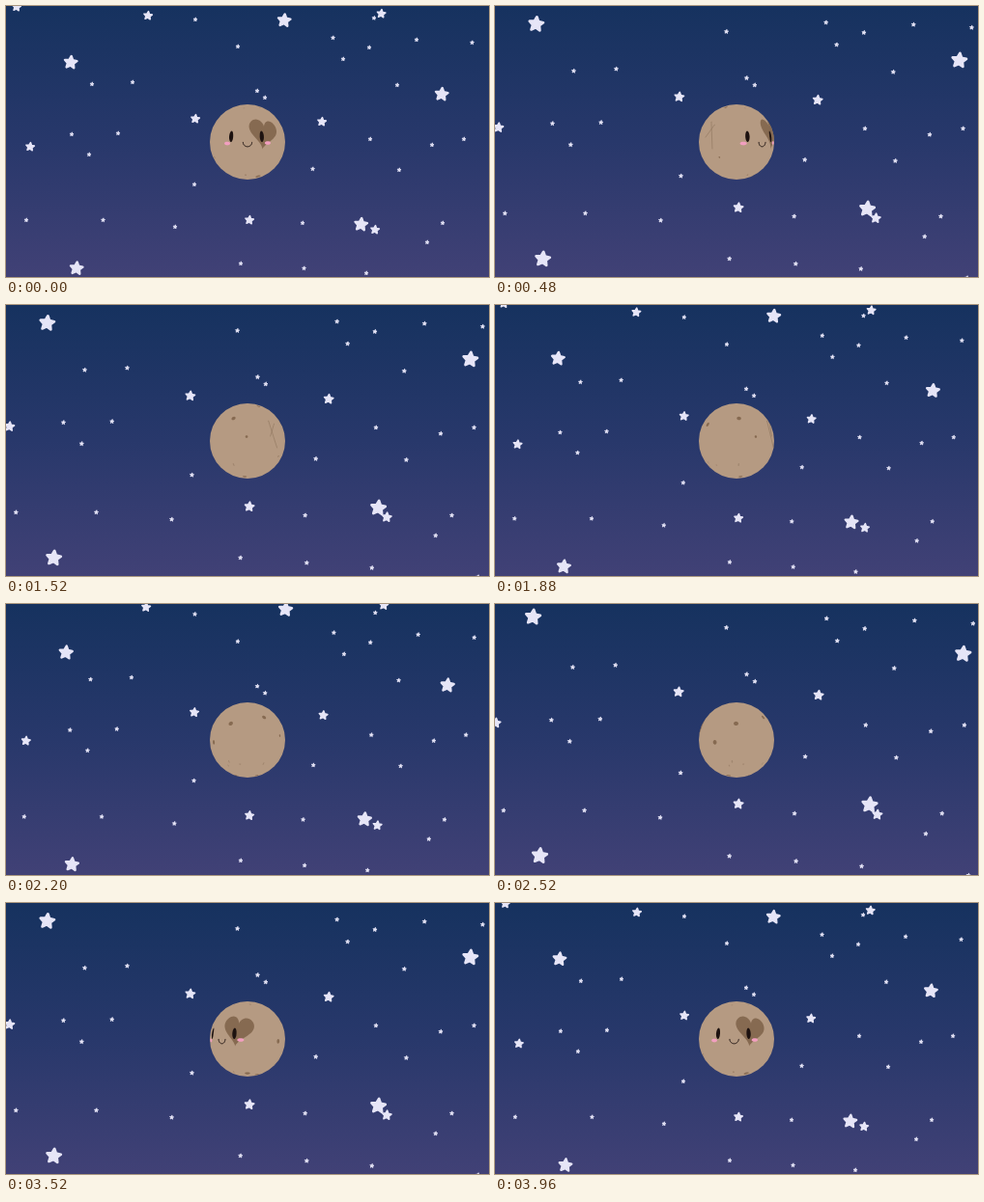
These frames come from a looping animation (500x281 px, 4000 ms). An HTML page with a canvas:

```html
<!DOCTYPE html>
<html lang="en">
<head>
<meta charset="utf-8">
<title>Spinning moon</title>
<style>
  html, body { margin: 0; width: 100%; height: 100%; overflow: hidden; background: #26376a; }
  canvas { display: block; width: 100vw; height: 100vh; }
</style>
</head>
<body>
<canvas id="stage" width="500" height="281"></canvas>
<script>
const ctx = document.getElementById('stage').getContext('2d');
const LOOP = 4000, STEP = 40, RAD = Math.PI / 180;
const MOON = { x: 250, y: 141, r: 39 };
const BROWN = '#866a51', INK = '#1d1210', PINK = '#f29fc0', FAINT = '#a0866f';

// Three star layers, each zooming about its own vanishing point.
const layers = [
  { radius: 2.1, zoom: 0.1, x: 250, y: 371, stars: [
    [196, 14], [240, 42], [381, 12.5], [338.5, 33], [349, 55], [376, 43], [425, 35],
    [482.5, 38], [405, 82], [89, 81], [131, 79], [260, 88], [268, 95], [68, 133],
    [116, 132], [86, 154], [195, 185], [377, 138], [441, 144], [474, 138], [317.5, 169],
    [407, 170], [21, 222], [100.5, 222], [175, 229], [307, 225], [452, 225], [436, 245],
    [243, 267], [308.5, 272], [373, 277], [478, 286]] },
  { radius: 4.4, zoom: 0.2, x: 252, y: 360, stars: [
    [11, 1], [147, 10], [388.5, 8], [196, 117], [327, 120], [25, 146], [252, 222], [382, 232]] },
  { radius: 6.6, zoom: 0.3, x: 240.5, y: 341, stars: [
    [67, 58.5], [288, 15], [451, 91.5], [73, 272], [367.5, 226.5]] }
];

// Surface marks: longitude, latitude (down is positive), radii in degrees, colour.
const craters = [
  [132.4, -26, 3.6, 3.4, BROWN], [98, 3.5, 3.4, 3.4, BROWN], [195.5, -37, 3.3, 3.2, BROWN],
  [-138.2, -6.6, 2, 2, BROWN], [-89, -67, 2, 3, BROWN], [-73, 24, 1.3, 1.4, BROWN],
  [43, 66, 4, 4, BROWN], [93, 71, 4, 3, BROWN], [-150, 71, 3, 3, BROWN],
  [-6, 61, 1.3, 1.3, BROWN], [-12, -64, 1.3, 1.3, FAINT], [54, -67, 1.6, 2, FAINT],
  [147, 40, 1.5, 1.2, FAINT], [-165, 39, 1, 3, FAINT], [125, 35, 1, 2.5, FAINT], [118, 43, 1, 2, FAINT]
];

const ellipse = (rx, ry, from = 0, to = 360) => Array.from({ length: 33 }, (_, i) => {
  const a = (from + (to - from) * i / 32) * RAD;
  return [rx * Math.cos(a), ry * Math.sin(a)];
});

const heart = Array.from({ length: 73 }, (_, i) => {
  const a = i * 5 * RAD, size = 1.62, tilt = 8 * RAD;
  const x = size * 16 * Math.sin(a) ** 3;
  const y = -size * (13 * Math.cos(a) - 5 * Math.cos(2 * a) - 2 * Math.cos(3 * a) - Math.cos(4 * a));
  return [x * Math.cos(tilt) - y * Math.sin(tilt), x * Math.sin(tilt) + y * Math.cos(tilt)];
});

const wrap = degrees => ((degrees + 180) % 360 + 360) % 360 - 180;

// Orthographic projection of a patch; its hidden part collapses onto the limb.
function patch(turn, lon, lat, points) {
  const center = wrap(lon + turn);
  ctx.beginPath();
  if (Math.abs(center) > 140) return;
  for (const [dx, dy] of points) {
    const l = Math.max(-90, Math.min(90, center + dx)) * RAD;
    const p = (lat + dy) * RAD;
    ctx.lineTo(MOON.x + MOON.r * Math.sin(l) * Math.cos(p), MOON.y + MOON.r * Math.sin(p));
  }
}

function fillPatch(turn, lon, lat, points, color) {
  patch(turn, lon, lat, points);
  ctx.fillStyle = color;
  ctx.fill();
}

function strokePatch(turn, lon, lat, points, color, width) {
  if (Math.abs(wrap(lon + turn)) > 86) return;
  patch(turn, lon, lat, points);
  ctx.strokeStyle = color;
  ctx.lineWidth = width;
  ctx.stroke();
}

function drawStar(x, y, radius) {
  ctx.beginPath();
  for (let i = 0; i < 10; i++) {
    const a = (i * 36 - 84) * RAD, r = radius * (i % 2 ? 0.48 : 1);
    ctx.lineTo(x + r * Math.cos(a), y + r * Math.sin(a));
  }
  ctx.closePath();
  ctx.lineWidth = radius * 0.36;
  ctx.fill();
  ctx.stroke();
}

function drawSky(t) {
  const sky = ctx.createLinearGradient(0, 0, 0, 281);
  sky.addColorStop(0, '#16325f');
  sky.addColorStop(0.5, '#28386b');
  sky.addColorStop(1, '#414176');
  ctx.fillStyle = sky;
  ctx.fillRect(0, 0, 500, 281);

  const ease = (1 - Math.cos(4 * Math.PI * t / LOOP)) / 2;
  ctx.fillStyle = ctx.strokeStyle = '#e6e5f7';
  for (const layer of layers) {
    const scale = 1 + layer.zoom * ease;
    for (const [x, y] of layer.stars) {
      drawStar(layer.x + (x - layer.x) * scale, layer.y + (y - layer.y) * scale, layer.radius * scale);
    }
  }
}

function drawMoon(t) {
  const turn = 360 * t / LOOP;
  ctx.beginPath();
  ctx.arc(MOON.x, MOON.y, MOON.r, 0, 2 * Math.PI);
  ctx.fillStyle = '#b59a82';
  ctx.fill();

  for (const [lon, lat, rx, ry, color] of craters) {
    fillPatch(turn, lon, lat, ellipse(rx / Math.cos(lat * RAD), ry), color);
  }
  strokePatch(turn, -90, -11, [[-5.6, -21.6], [6, 21.3]], '#8f765f', 0.6);
  strokePatch(turn, -91, -17, [[7, -10.5], [-8, 9.6]], '#8f765f', 0.6);

  fillPatch(turn, 27.4, -16, heart, BROWN);
  fillPatch(turn, -32.6, 2.3, ellipse(5.3, 2.7), PINK);
  fillPatch(turn, 32.6, 1.5, ellipse(5.3, 2.7), PINK);
  fillPatch(turn, -26, -8.5, ellipse(3.4, 8.5), INK);
  fillPatch(turn, 22.6, -8.5, ellipse(3.4, 8.5), INK);
  strokePatch(turn, 0, 0.5, ellipse(6.8, 6.6, 0, 180), INK, 1);
}

function draw(now) {
  const t = Math.floor(now % LOOP / STEP) * STEP;
  drawSky(t);
  drawMoon(t);
}

ctx.lineJoin = ctx.lineCap = 'round';
let start;
function tick(now) {
  start ??= now;
  draw(now - start);
  requestAnimationFrame(tick);
}
draw(0);
requestAnimationFrame(tick);
</script>
</body>
</html>
```
